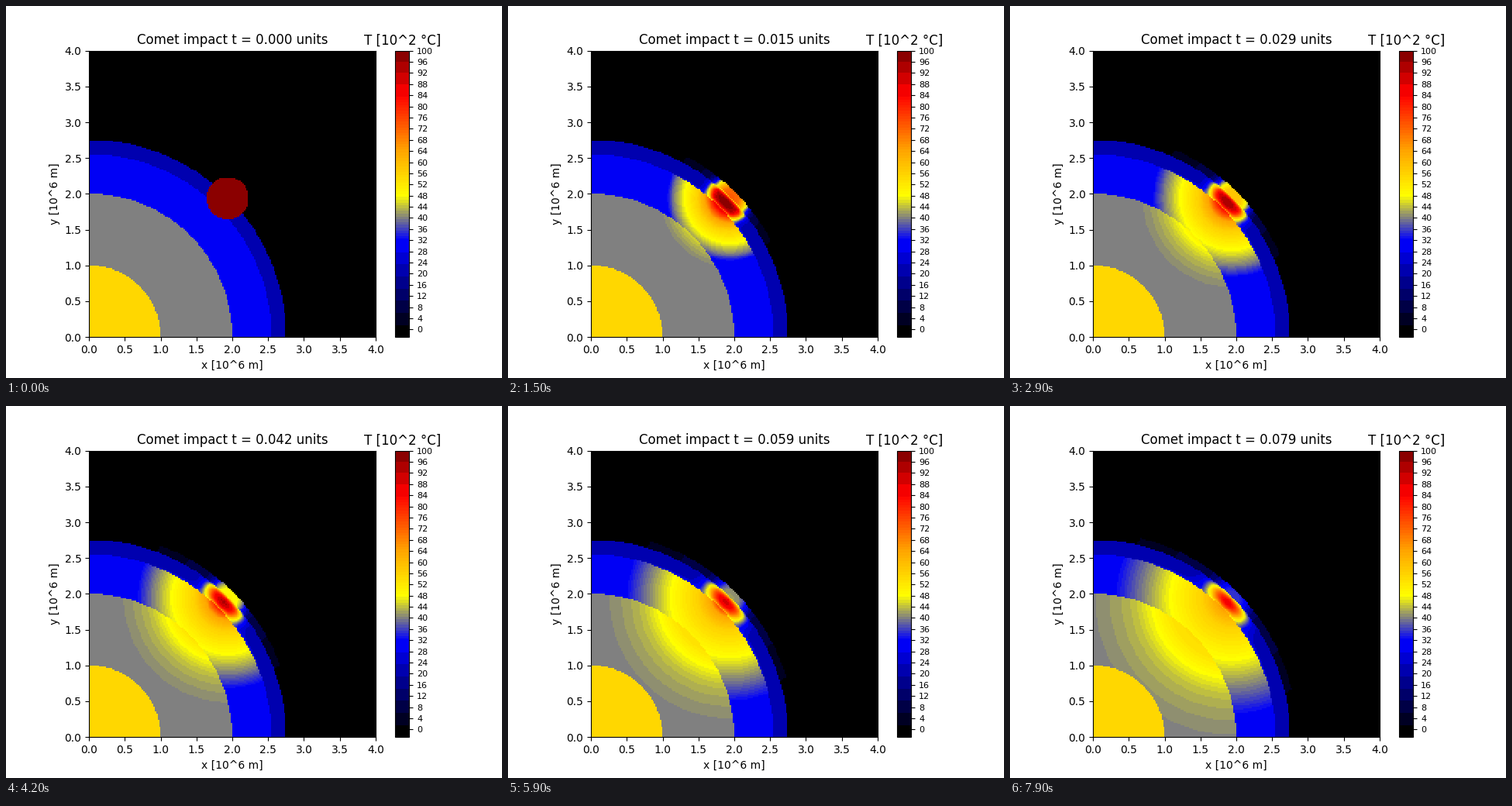
Recreate the animation shown at these times as a matplotlib script. Size 640 px wide and 480 px high, loop 8000 ms.

```python
import numpy as np
import matplotlib.pyplot as plt
from matplotlib.animation import FuncAnimation
from matplotlib.colors import BoundaryNorm, ListedColormap

FRAMES, INTERVAL = 80, 100
N, SIZE = 200, 4.0
COLD, CRUST, OUTER, MANTLE, CORE, HOT = -2.73, 20, 30, 40, 55, 100
IMPACT, RADIUS = 1.935, 0.295

# Isotherms: (temperature, a, b, c); radius = (a + b*sqrt(t) - c*t) / 100
OUTER_ISO = [
    (100, 29, -17, 0), (84, 29, -6.2, 0), (64, 29, 10.3, 4.8),
    (56, 29, 20.3, 5.7), (48, 29, 33.3, 4.7), (40, 29, 44.4, 3.8),
    (32.5, 30, 46.3, 0), (30, 29, 62, 0),
]
MANTLE_ISO = [
    (58, 0, 0, 0), (53, 38, 17.3, 0), (48, 31, 28.4, 0), (44, 34.6, 35.7, 0),
    (42, 30.3, 46.3, 0), (40.5, 22, 59.9, 0), (40, 24, 70, 0),
]

axis = (np.arange(N) + 0.5) * SIZE / N
X, Y = np.meshgrid(axis, axis)
R = np.hypot(X, Y)
D = np.hypot(X - IMPACT, Y - IMPACT)

core = R < 1
mantle = (R >= 1) & (R < 2)
outer = (R >= 2) & (R < 2.55)
crust = (R >= 2.55) & (R < 2.75)
air = (R >= 2.75) & (R < 2.85)


def make_colors():
    """Banded colour scale: wide steps in blue and dark red, fine between."""
    edges = np.concatenate([np.linspace(COLD, 32, 9)[:8],
                            np.arange(32.5, 84), [88, 92, 96, 100]])
    stops = [32, 40, 48, 64, 84]
    mid = np.arange(33, 84)
    red = np.interp(mid, stops, [0, 128, 255, 255, 255])
    green = np.interp(mid, stops, [0, 128, 255, 165, 0])
    blue = np.interp(mid, stops, [255, 128, 0, 0, 0])
    colors = [(0, 0, 35 * k) for k in range(8)]
    colors += list(zip(red, green, blue))
    colors += [(v, 0, 0) for v in np.linspace(245, 139, 4)]
    cmap = ListedColormap(np.array(colors) / 255)
    return cmap, BoundaryNorm(edges, len(colors))


def spread(iso, t):
    """Temperature around the impact point from its moving isotherms."""
    temp, a, b, c = np.array(iso).T
    radius = np.maximum(a + b * np.sqrt(t) - c * t, 0) / 100
    radius = np.maximum.accumulate(radius) + 1e-6 * np.arange(len(temp))
    return np.interp(D, radius, temp)


def crust_temp(t, below):
    s = np.sqrt(t)
    lateral = 0.5 - 0.5 * np.tanh((D - 0.29) / (0.006 + 0.064 * s))
    skin = 0.008 + 0.012 * s
    inner = np.exp(-np.abs(R - 2.55) / skin)
    top = np.exp(-np.abs(2.75 - R) / skin)
    loss = 1 - 0.45 * inner - 0.6 * top
    warm = 0.4 * (below - OUTER) * inner * (1 - lateral)
    return CRUST + (HOT - CRUST) * lateral * loss + warm


def air_temp(t):
    peak = (HOT - COLD) * (1 + t / 3.3) ** -0.82
    reach = 0.29 + 0.444 * np.sqrt(t)
    tail = 14 * np.exp(-1.2 * (D / reach) ** 2)
    return COLD + tail + (peak - 14) * np.exp(-(D / 0.3) ** 4)


def field(t):
    temp = np.full((N, N), COLD)
    temp[core] = CORE
    if t == 0:
        temp[mantle], temp[outer], temp[crust] = MANTLE, OUTER, CRUST
        temp[D < RADIUS] = HOT
        return temp
    below = spread(OUTER_ISO, t)
    temp[mantle] = spread(MANTLE_ISO, t)[mantle]
    temp[outer] = below[outer]
    temp[crust] = crust_temp(t, below)[crust]
    temp[air] = air_temp(t)[air]
    return np.clip(temp, COLD, HOT)


fig = plt.figure(figsize=(6.4, 4.8), dpi=100)
ax = fig.add_axes([107.2 / 640, 0.11, 369.6 / 640, 0.77])
cax = fig.add_axes([502 / 640, 0.11, 18.48 / 640, 0.77])

cmap, norm = make_colors()
image = ax.imshow(field(0), origin="lower", extent=(0, SIZE, 0, SIZE),
                  cmap=cmap, norm=norm, interpolation="nearest", aspect="auto")
ticks = np.arange(0, 4.1, 0.5)
ax.set_xticks(ticks)
ax.set_yticks(ticks)
ax.set_xlabel("x [10^6 m]")
ax.set_ylabel("y [10^6 m]")
title = ax.set_title("")

bar = fig.colorbar(image, cax=cax, spacing="proportional",
                   ticks=list(range(0, 101, 4)), format="%d")
bar.minorticks_off()
cax.tick_params(labelsize=8)
cax.set_title("T [10^2 °C]")


def update(i):
    image.set_data(field(i * INTERVAL / 1000))
    title.set_text(f"Comet impact t = {i / 1000:.3f} units")
    return image, title


anim = FuncAnimation(fig, update, frames=FRAMES, interval=INTERVAL,
                     repeat=True, repeat_delay=0, blit=False)
plt.show()
```
